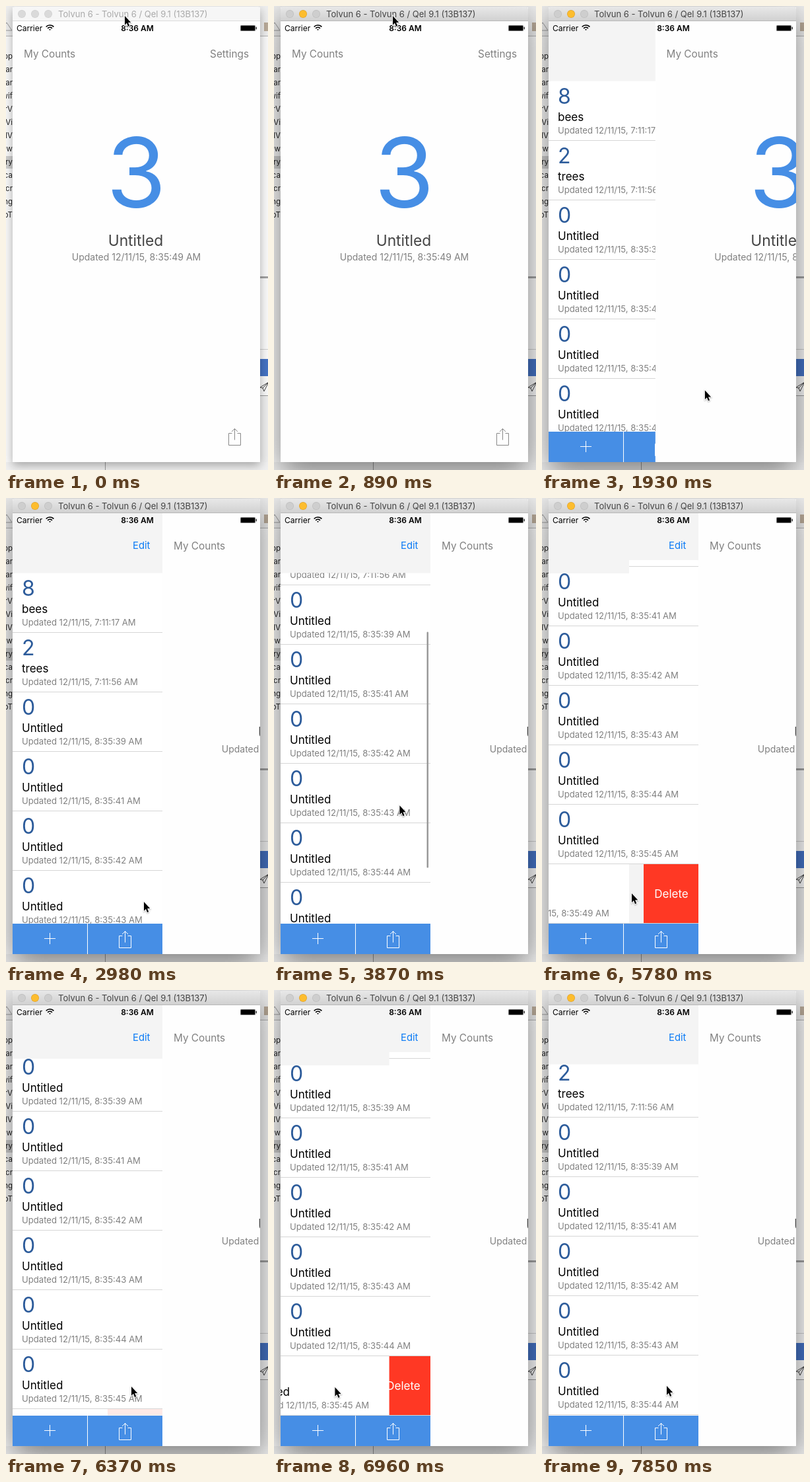
An HTML page with a canvas for the animation above (8 s loop, 397 px wide and 702 px high).

```html
<!DOCTYPE html>
<html lang="en">
<head>
<meta charset="utf-8">
<title>Counts</title>
<style>
html, body { margin: 0; width: 100%; height: 100%; overflow: hidden; }
canvas { display: block; }
</style>
</head>
<body>
<canvas id="stage" width="397" height="702"></canvas>
<script>
const c = document.getElementById('stage').getContext('2d');
const LOOP = 8000, ROW = 90, LIST_TOP = 113.5, MENU = 227, SCROLL_MAX = 280;
const BLUE = '#468ee5', PALE = '#f4f4f4', GRAY = '#808080';

const rows = [
  [8, 'bees', '7:11:17'], [2, 'trees', '7:11:56'],
  ...[39, 41, 42, 43, 44, 45].map(s => [0, 'Untitled', '8:35:' + s]),
  [3, 'Untitled', '8:35:49']
];
const files = 'pp par gar wif erV Vi elV iew ry xca Scr ing ppT'.split(' ');
const swipeStarts = [5340, 6718];
const deleteStarts = [6080, 7495];

// Pointer moves: start, end, x, y
const moves = [
  [900, 1620, 88, 592], [1640, 2010, 268, 580], [2080, 2380, 213, 594],
  [2530, 2980, 209, 611], [3570, 3900, 190, 462], [4020, 4600, 208, 606],
  [5190, 5640, 128, 598], [5700, 6060, 190, 600], [6550, 7020, 88, 601],
  [7080, 7420, 189, 599]
];

function smooth(t, from, to) {
  const u = Math.min(1, Math.max(0, (t - from) / (to - from)));
  return u * u * (3 - 2 * u);
}

// Overshoot that peaks at 1 one span after its start, then dies away
function bounce(t, start, span) {
  const h = Math.max(0, (t - start) / span);
  return h * Math.exp(1 - h);
}

const menuOpen = t => MENU * smooth(t, 1600, 2113);
const scroll = t => SCROLL_MAX * smooth(t, 3570, 4115) + 18 * bounce(t, 4050, 80);
const barAlpha = t => smooth(t, 3560, 3640) - smooth(t, 4650, 4900);
const swipe = t => 83 * smooth(t, 0, 360) + 22 * bounce(t, 320, 120);

function deletion(t, start) {
  const u = Math.min(1, Math.max(0, (t - start) / 415));
  return u < .5 ? 4 * u ** 3 : 1 - 4 * (1 - u) ** 3;
}

function pointer(t) {
  let x = 180, y = 15;
  for (const [from, to, nx, ny] of moves) {
    const u = smooth(t, from, to);
    x += (nx - x) * u;
    y += (ny - y) * u;
  }
  return [x, y];
}

function rect(x, y, w, h, color) {
  c.fillStyle = color;
  c.fillRect(x, y, w, h);
}

function text(s, x, y, size, color, weight = 400, align = 'left') {
  c.font = `${weight} ${size}px Inter, "Open Sans", sans-serif`;
  c.textAlign = align;
  c.fillStyle = color;
  c.fillText(s, x, y);
}

function dot(x, y, r, color) {
  c.fillStyle = color;
  c.beginPath();
  c.arc(x, y, r, 0, 7);
  c.fill();
}

function pill(x, y, w, h, r, color) {
  c.fillStyle = color;
  c.beginPath();
  c.roundRect(x, y, w, h, r);
  c.fill();
}

function stroke(path, x, y, color) {
  c.save();
  c.translate(x, y);
  c.strokeStyle = color;
  c.lineWidth = 1;
  c.stroke(new Path2D(path));
  c.restore();
}

function clipped(x, y, w, h, draw) {
  c.save();
  c.beginPath();
  c.rect(x, y, w, h);
  c.clip();
  draw();
  c.restore();
}

const share = (x, y, color) =>
  stroke('M-4 -6H-9V12H9V-6H4M0 4V-13M-4.5 -8.5L0 -13L4.5 -8.5', x, y, color);

function desktop(active) {
  rect(0, 0, 397, 702, '#fafafa');
  rect(0, 0, 397, 45, '#eeeeee');
  rect(0, 45, 397, 1, '#b4b4b4');
  stroke('M-6 13L1 1L9 13Z', 0, 24, '#999');
  rect(391, 25, 6, 13, '#b9aa98');
  rect(0, 227, 10, 19, '#cfcfcf');
  files.forEach((s, i) => text(s, 10, 80 + 20 * i, 11.5, '#222', 400, 'right'));
  rect(385, 409, 12, 3, '#a2a2a2');
  rect(385, 519, 12, 1, '#cfcfcf');
  rect(385, 534, 12, 26, '#4573c4');
  stroke('M13 0L0 8L4 9L6 14L13 0L4 9', 385, 569, '#444');
  rect(385, 589, 12, 1, '#999');
  rect(385, 590, 12, 112, '#eeeeee');
  rect(0, 690, 397, 12, '#f0f0f0');
  rect(150, 690, 1, 12, '#9a9a9a');
  c.save();
  c.shadowColor = active ? 'rgba(0,0,0,.5)' : 'rgba(0,0,0,.32)';
  c.shadowBlur = active ? 44 : 14;
  c.shadowOffsetY = active ? 14 : 5;
  rect(10, 2, 375, 688, '#fff');
  c.restore();
}

function titleBar(active) {
  const g = c.createLinearGradient(0, 2, 0, 22);
  g.addColorStop(0, active ? '#e7e7e7' : '#f6f6f6');
  g.addColorStop(1, active ? '#d1d1d1' : '#f6f6f6');
  pill(10, 1, 375, 22, [4, 4, 0, 0], g);
  rect(10, 22, 375, 1, active ? '#b8b8b8' : '#dcdcdc');
  [24, 44, 64].forEach((x, i) => {
    const lit = active && i === 1;
    dot(x, 12, 6, lit ? '#e0a22c' : active ? '#bdbdbd' : '#cfcfcf');
    dot(x, 12, 5.3, lit ? '#fdbd2e' : active ? '#cecece' : '#dadada');
  });
  text('Tolvun 6 - Tolvun 6 / Qel 9.1 (13B137)', 79, 17, 13, active ? '#444' : '#a9a9a9');
}

function statusBar() {
  text('Carrier', 16, 38, 12, '#000');
  text('8:36 AM', 199, 38, 12, '#000', 600, 'center');
  c.strokeStyle = '#000';
  c.lineWidth = 1.7;
  for (const r of [1.2, 4.6, 8]) {
    c.beginPath();
    c.arc(66.5, 37, r, -Math.PI * .76, -Math.PI * .24);
    c.stroke();
  }
  pill(355, 29, 23, 9, 1.5, '#777');
  pill(356, 30, 21, 7, 1, '#000');
  pill(378.5, 31.5, 1.5, 4, 1, '#333');
}

function row([count, name, time], y, slide) {
  const top = Math.floor(y), x = 24 - slide;
  if (slide > 0) {
    rect(10, y, MENU, ROW, '#f3f3f3');
    rect(154, y, 83, ROW, '#ff3824');
    text('Delete', 196, top + 52, 17, '#fff', 400, 'center');
  }
  clipped(10, y, MENU - slide, ROW, () => {
    rect(10, y, MENU, ROW, '#fff');
    text(count, x, top + 35, 32, '#2d5c9b');
    text(name, x, top + 61, 17, '#000');
    text(`Updated 12/11/15, ${time} AM`, x, top + 80, 13.1, GRAY);
  });
  rect(10, top + ROW, MENU, 1, '#d6d6d6');
}

function menu(t) {
  const done = deleteStarts.map(s => deletion(t, s));
  const gone = done.filter(p => p === 1).length;
  const last = rows.length - 1 - gone;
  const p = done[gone] || 0;
  const slide = gone < 2 ? swipe(t - swipeStarts[gone]) : 0;
  const base = scroll(t), offset = base - ROW * (done[0] + done[1]);

  // The header is pushed up by overscroll, and returns with the rows
  let bottom = LIST_TOP - Math.max(0, base - SCROLL_MAX);
  if (p > 0) bottom = LIST_TOP - ROW * (1 - p);
  else if (slide > 0) bottom = 94;
  bottom = Math.max(94, bottom);

  rect(10, 23, MENU, 667, '#fff');
  clipped(10, 94, MENU, 550, () => {
    c.globalAlpha = 1 - p;
    row(rows[last], LIST_TOP + ROW * (last - p) - offset, slide);
    c.globalAlpha = 1;
    for (let i = last - 1; i >= 0; i--) row(rows[i], LIST_TOP + ROW * i - offset, 0);
    c.globalAlpha = barAlpha(t);
    const y = 94.5 + .667 * base;
    pill(231.5, y, 2.5, Math.min(357, 641 - y), 1.2, '#999');
  });
  rect(10, 23, MENU, bottom - 23, PALE);
  if (slide > 0 && p === 0) rect(10, 23, MENU - slide, 91, PALE);
  text('Edit', 192, 77, 14.8, '#0b7bf5');

  rect(10, 644, MENU, 46, BLUE);
  rect(123, 644, 1, 46, '#fff');
  stroke('M-8.5 0H8.5M0 -8.5V8.5', 66.5, 666.5, '#fff');
  share(180.5, 668.5, '#fff');
}

function cover(x) {
  clipped(10 + x, 23, 375 - x, 667, () => {
    rect(10 + x, 23, 375, 667, '#fefefe');
    text('My Counts', 27 + x, 78, 15.3, GRAY);
    text('Settings', 368 + x, 78, 15.3, GRAY, 400, 'right');
    text('3', 197.5 + x, 305, 147, BLUE, 400, 'center');
    text('Untitled', 196.5 + x, 363, 22.8, '#444', 400, 'center');
    text('Updated 12/11/15, 8:35:49 AM', 197.5 + x, 385, 14, GRAY, 400, 'center');
    share(346.5 + x, 652.5, '#888');
  });
}

function arrow([x, y]) {
  const p = new Path2D('M0 0V14.5L3.3 11.4L5.6 16.8L8 15.8L5.7 10.5H10.3Z');
  c.save();
  c.translate(x, y);
  c.scale(.9, .95);
  c.shadowColor = 'rgba(0,0,0,.3)';
  c.shadowBlur = 2;
  c.shadowOffsetY = 1;
  c.strokeStyle = '#fff';
  c.lineWidth = 2;
  c.stroke(p);
  c.shadowColor = 'transparent';
  c.fillStyle = '#000';
  c.fill(p);
  c.restore();
}

function draw(now) {
  const t = now % LOOP, active = t >= 450;
  desktop(active);
  titleBar(active);
  menu(t);
  cover(menuOpen(t));
  statusBar();
  arrow(pointer(t));
  requestAnimationFrame(draw);
}
requestAnimationFrame(draw);
</script>
</body>
</html>
```
